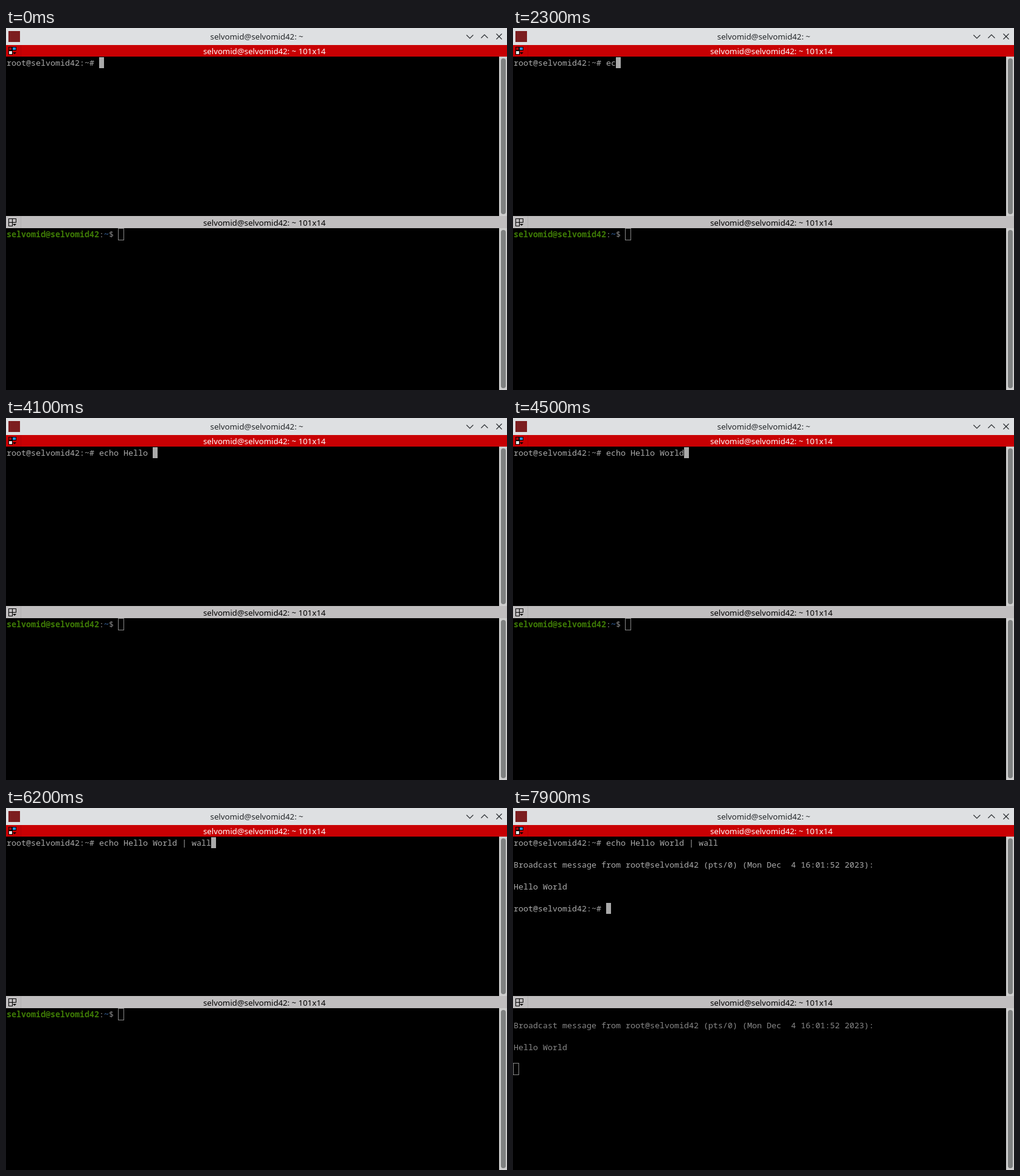
Recreate the animation shown at these times as an HTML page with a canvas. Size 823 by 595 pixels, loop 8 s.

```html
<!DOCTYPE html>
<html lang="en">
<head>
<meta charset="utf-8">
<title>Terminal broadcast</title>
<style>
html, body { margin: 0; width: 100%; height: 100%; overflow: hidden; background: #000; }
canvas { display: block; }
</style>
</head>
<body>
<canvas id="stage" width="823" height="595"></canvas>
<script>
const ctx = document.getElementById('stage').getContext('2d');
const LOOP = 8000, CELL = 8, ROW = 18, LEFT = 1;
const SANS = '13.2px "Noto Sans", sans-serif';
const MONO = '13.333px "Noto Sans Mono", monospace';
const USER = 'selvomid', HOST = USER + '42';
const TITLE = `${USER}@${HOST}: ~`;
const ROOT = `root@${HOST}:~# `;
const COMMAND = 'echo Hello World | wall';
const OUTPUT = `Broadcast message from root@${HOST} (pts/0) (Mon Dec  4 16:01:52 2023):`;
const SENT = 6700, HINT_END = 7700;

// [time, typed characters]
const TYPING = [
  [0, 0], [2000, 1], [2300, 2], [2400, 3], [2600, 4], [2900, 5],
  [3500, 6], [3600, 7], [3700, 8], [3800, 9], [3900, 10],
  [4100, 11], [4200, 12], [4300, 13], [4400, 15], [4500, 16], [4600, 17],
  [5400, 18], [5700, 19], [5800, 20], [6000, 21], [6100, 22], [6200, 23]
];
const CURSOR_OFF = [[500, 1100], [1700, 2000], [7300, 7900]];

function box(x, y, w, h, color) {
  ctx.fillStyle = color;
  ctx.fillRect(x, y, w, h);
}

function text(str, x, y, color, font = MONO, align = 'left') {
  ctx.font = font;
  ctx.textAlign = align;
  ctx.fillStyle = color;
  ctx.fillText(str, x, y);
}

function line(points, color) {
  ctx.strokeStyle = color;
  ctx.lineWidth = 1.1;
  ctx.beginPath();
  points.forEach(([x, y]) => ctx.lineTo(x, y));
  ctx.stroke();
}

function cell(str, col, row, top, color, bold) {
  text(str, LEFT + col * CELL, top + row * ROW + 14, color, (bold ? 'bold ' : '') + MONO);
}

function frameBox(x, y, w, h, color) {
  ctx.strokeStyle = color;
  ctx.lineWidth = 1;
  ctx.strokeRect(x + 0.5, y + 0.5, w - 1, h - 1);
}

function windowBar() {
  box(0, 0, 823, 28, '#dee0e2');
  box(4, 5, 19, 18, '#7c1d1f');
  text(TITLE, 412, 19, '#232629', SANS, 'center');
  line([[756.5, 11.5], [762, 17], [767.5, 11.5]], '#232629');
  line([[780.5, 16.5], [786, 11], [791.5, 16.5]], '#232629');
  line([[805.5, 9.5], [814.5, 18.5]], '#232629');
  line([[814.5, 9.5], [805.5, 18.5]], '#232629');
}

function paneIcon(y, active) {
  if (active) {
    box(4, y, 6, 6, '#000');
    box(5, y + 1, 4, 4, '#b00003');
    box(10, y, 7, 6, '#000');
    box(11, y + 1, 5, 4, '#2a8fd8');
    box(4, y + 6, 7, 7, '#000');
    box(5, y + 7, 5, 5, '#e4e4e4');
  } else {
    frameBox(4, y, 7, 7, '#000');
    frameBox(10, y, 7, 7, '#000');
    frameBox(4, y + 6, 7, 7, '#000');
  }
  ctx.fillStyle = '#000';
  ctx.beginPath();
  ctx.moveTo(11, y + 9);
  ctx.lineTo(17, y + 9);
  ctx.lineTo(14, y + 12);
  ctx.fill();
}

function bulb(y) {
  box(811, y + 10, 6, 5, '#555b60');
  box(812, y + 11, 4, 1, '#d5d5d5');
  box(812, y + 13, 4, 1, '#b0b0b0');
  ctx.beginPath();
  ctx.arc(814, y + 6, 5.3, 0, Math.PI * 2);
  ctx.fillStyle = '#eef3f8';
  ctx.fill();
  ctx.strokeStyle = '#5d6873';
  ctx.lineWidth = 1;
  ctx.stroke();
  line([[812, y + 5], [813, y + 7], [814, y + 5], [815, y + 7], [816, y + 5]], '#8b98a5');
  line([[814, y + 7], [814, y + 10]], '#8b98a5');
}

function paneBar(y, h, active, hint) {
  box(0, y, 823, h, active ? '#c80003' : '#c0bebf');
  box(24, y, 1, h, active ? '#b50003' : '#b2b0b1');
  paneIcon(active ? 31 : 313, active);
  text(TITLE + ' 101x14', hint ? 414.5 : 424.5, active ? 43 : 325, active ? '#fff' : '#000', SANS, 'center');
  if (hint) bulb(y + (active ? 2 : 2));
}

function scrollbar(y, bottom) {
  box(810, y, 13, bottom - y, '#cfcfcf');
  ctx.fillStyle = '#7f8181';
  ctx.beginPath();
  ctx.roundRect(813, y + 3, 8, bottom - y - 6, 4);
  ctx.fill();
}

function message(row, top, color) {
  cell(OUTPUT, 0, row, top, color);
  cell('Hello World', 0, row + 2, top, color);
}

function topPane(t, sent) {
  const top = 48, color = '#aaa';
  const typed = TYPING.filter(([at]) => at <= t).pop()[1];
  cell(ROOT + COMMAND.slice(0, typed), 0, 0, top, color);
  if (sent) {
    message(2, top, color);
    cell(ROOT, 0, 6, top, color);
  }
  if (CURSOR_OFF.some(([from, to]) => t >= from && t < to)) return;
  const col = ROOT.length + (sent ? 0 : typed);
  box(LEFT + col * CELL, top + (sent ? 6 : 0) * ROW, CELL, ROW, color);
}

function bottomPane(sent) {
  const top = 330, color = '#888';
  if (sent) {
    message(1, top, color);
    frameBox(0, top + 5 * ROW - 1, 10, 20, color);
    return;
  }
  const name = `${USER}@${HOST}`, n = name.length;
  cell(name, 0, 0, top, '#3e7b05', true);
  cell(':', n, 0, top, color);
  cell('~', n + 1, 0, top, '#2a5183', true);
  cell('$', n + 2, 0, top, color);
  frameBox((n + 4) * CELL, top - 1, 10, 20, color);
}

function draw(t) {
  const sent = t >= SENT, hint = sent && t < HINT_END;
  box(0, 0, 823, 595, '#000');
  windowBar();
  paneBar(28, 19, true, hint);
  paneBar(309, 20, false, hint);
  scrollbar(47, 309);
  scrollbar(329, 595);
  topPane(t, sent);
  bottomPane(sent);
}

const start = performance.now();
function tick() {
  draw((performance.now() - start) % LOOP);
  requestAnimationFrame(tick);
}
tick();
</script>
</body>
</html>
```
